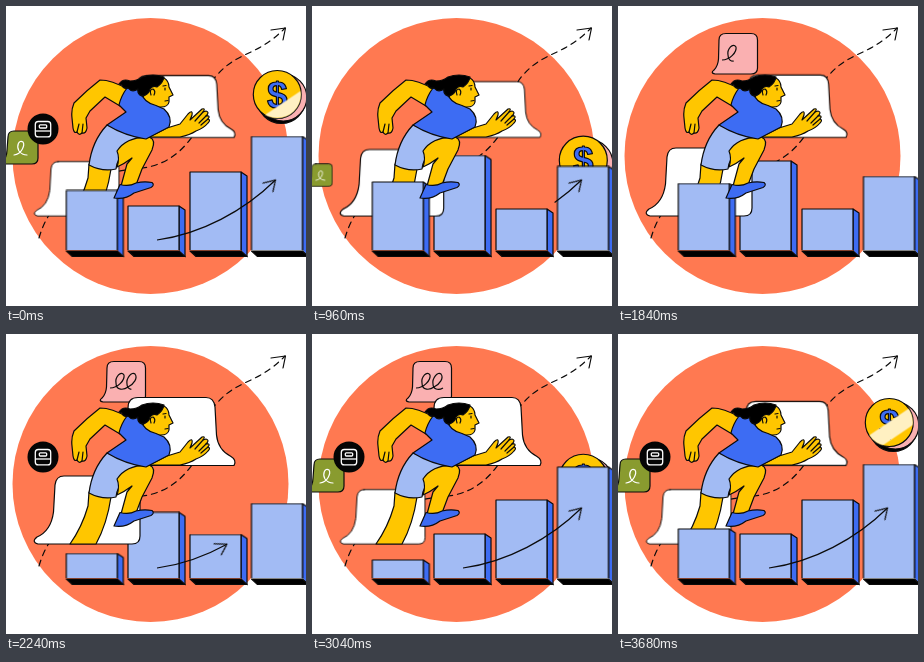
Animation of 300x300 px, one loop 3.76 s. Source, as an HTML page:

```html
<!DOCTYPE html>
<html lang="en">
<head>
<meta charset="utf-8">
<title>Climbing the chart</title>
<style>
html, body { margin: 0; width: 100%; height: 100%; overflow: hidden; background: #fff; }
svg { display: block; width: 100vw; height: 100vh; }
.ink { stroke: #0b0b0b; stroke-width: 1.2; stroke-linejoin: round; stroke-linecap: round; }
.line { fill: none; }
.skin { fill: #ffc600; }
.blue { fill: #3d6cf3; }
.pale { fill: #a2bbf4; }
.white { fill: #fff; }
.pink { fill: #fab0b1; }
.green { fill: #899b2f; }

.move { animation: 3760ms linear infinite; }
#bar1 { animation-name: bar1; animation-delay: -400ms; }
#bar2 { animation-name: bar2; }
#bar3 { animation-name: bar3; }
#bar4 { animation-name: bar4; }
#talkR { animation-name: talkR; animation-delay: -400ms; transform-origin: 228px 131px; }
#talkL { animation-name: talkL; transform-origin: 29px 210px; }
#pink { animation-name: pink; transform-origin: 93px 112px; }
#scrawl { animation-name: scrawl; stroke-dasharray: 100 200; stroke-linecap: butt; }
#green { animation-name: green; transform-origin: -5px 229px; }
#disc { animation-name: disc; transform-origin: 37px 123px; }
#coin { animation-name: coin; }
#shine { animation-name: shine; animation-delay: -320ms; }
#trend { animation-name: trend; stroke-dasharray: 100 200; stroke-linecap: butt; }
#tip { animation-name: tip; offset-path: path("M151 234C195 228 238 205 269.5 174"); offset-rotate: auto; }

@keyframes bar1 {
  0% { transform: translateY(226px); animation-timing-function: ease-in-out; }
  14.89%, 57.45% { transform: translateY(176px); animation-timing-function: ease-in-out; }
  74.47%, 100% { transform: translateY(226px); }
}
@keyframes bar2 {
  0%, 4.26% { transform: translateY(200px); animation-timing-function: ease-in-out; }
  18.09%, 46.81% { transform: translateY(149.5px); animation-timing-function: ease-out; }
  78.72%, 100% { transform: translateY(200px); }
}
@keyframes bar3 {
  0%, 2.13% { transform: translateY(166px); animation-timing-function: ease-in-out; }
  21.28%, 55.32% { transform: translateY(203px); animation-timing-function: ease-in-out; }
  78.72%, 100% { transform: translateY(166px); }
}
@keyframes bar4 {
  0%, 9.57% { transform: translateY(130.5px); animation-timing-function: ease-in-out; }
  34.04%, 56.38% { transform: translateY(170.5px); animation-timing-function: ease-in-out; }
  86.17%, 100% { transform: translateY(130.5px); }
}
@keyframes talkR {
  0% { transform: scale(1); animation-timing-function: ease-in-out; }
  21.28%, 48.94% { transform: scale(.82); animation-timing-function: ease-in-out; }
  69.15%, 100% { transform: scale(1); }
}
@keyframes talkL {
  0%, 4.26% { transform: scale(.8); animation-timing-function: ease-in-out; }
  31.91%, 59.57% { transform: scale(1); animation-timing-function: ease-in-out; }
  78.72%, 100% { transform: scale(.8); }
}
@keyframes pink {
  0%, 30.85% { transform: scale(0); animation-timing-function: cubic-bezier(.2, .5, .4, 1); }
  45.2%, 86.17% { transform: scale(1); animation-timing-function: ease-in; }
  97.5%, 100% { transform: scale(0); }
}
@keyframes scrawl {
  0%, 42% { stroke-dashoffset: 100; animation-timing-function: ease-out; }
  63.83%, 100% { stroke-dashoffset: 0; }
}
@keyframes green {
  0%, 19.15% { transform: scale(1); animation-timing-function: ease-in; }
  31.91%, 61.7% { transform: scale(0); animation-timing-function: ease-in-out; }
  78.72%, 100% { transform: scale(1); }
}
@keyframes disc {
  0%, 4.26% { transform: scale(1); animation-timing-function: ease-in; }
  14.89%, 48.94% { transform: scale(0); animation-timing-function: ease-out; }
  59.57%, 100% { transform: scale(1); }
}
@keyframes coin {
  0%, 14.89% { transform: translate(271.3px, 88.5px); animation-timing-function: ease-in; }
  29.79%, 74.47% { transform: translate(271.3px, 203px); animation-timing-function: ease-out; }
  92.55%, 100% { transform: translate(271.3px, 88.5px); }
}
@keyframes shine {
  0% { transform: translateY(-35px); animation-timing-function: ease-out; }
  14.89%, 100% { transform: translateY(35px); }
}
@keyframes trend {
  0%, 10.64% { stroke-dashoffset: 0; }
  17.02% { stroke-dashoffset: -22; }
  29.79% { stroke-dashoffset: -100; }
  29.8%, 48.94% { stroke-dashoffset: 100; }
  59.57% { stroke-dashoffset: 45; }
  72.34% { stroke-dashoffset: 8; }
  80.85%, 100% { stroke-dashoffset: 0; }
}
@keyframes tip {
  0%, 29.78% { offset-distance: 100%; opacity: 1; }
  29.79%, 48.94% { offset-distance: 0%; opacity: 0; }
  48.95% { offset-distance: 0%; opacity: 1; }
  59.57% { offset-distance: 55%; }
  72.34% { offset-distance: 92%; }
  80.85%, 100% { offset-distance: 100%; opacity: 1; }
}
</style>
</head>
<body>
<svg viewBox="0 0 300 300">
  <defs>
    <clipPath id="column"><path d="M-2-250H59V253L51 244H-2Z"/></clipPath>
    <clipPath id="face"><circle r="23.6"/></clipPath>
    <g id="body">
      <path class="ink blue" d="M51 0L57 4V260H51Z"/>
      <path class="ink pale" d="M0 0H51V250H0Z"/>
    </g>
    <path id="base" class="ink" d="M0 245H51L57 250.5H6Z"/>
  </defs>

  <circle cx="144.5" cy="150" r="138" fill="#ff7951"/>

  <path class="ink line" stroke-dasharray="6 5" d="M33 232C48 180 95 165 137 162C165 158 180 140 188 128C200 108 198 82 211 69C232 45 252 50 279 22"/>
  <path class="ink line" d="M265 24L279.500 22L277 34"/>

  <g id="pink" class="move">
    <path class="ink pink" d="M108 27.500H133Q139.500 27.500 139.500 34V62Q139.500 68 133 68H97Q92 67 96 64Q100 60 100.500 53L101 34Q101 27.500 108 27.500Z"/>
    <path id="scrawl" class="ink line move" pathLength="100" d="M104 54C112 54 119 46 118 41C115 36 109 43 110 49C110 57 118 56 122 53C128 50 132 44 129 40C126 37 120 44 121 50C121 55 126 57 131 54"/>
  </g>

  <path id="talkR" class="ink white move" d="M132 63.500H200Q208 63.500 209 73L210.500 101Q212 116 225 122.500Q231 126 228 131.500H122V74Q122 63.500 132 63.500Z"/>

  <g id="coin" class="move">
    <circle class="ink" cx="4" cy="5" r="24"/>
    <circle class="ink pink" cx="6" cy="3" r="23.500"/>
    <circle class="ink skin" r="24"/>
    <text class="ink blue" y="13" font-family="'Liberation Sans', Arial, sans-serif" font-weight="700" font-size="37" text-anchor="middle">$</text>
    <g clip-path="url(#face)"><g transform="rotate(-34)">
      <rect id="shine" class="move" x="-40" y="-8" width="80" height="16" fill="#fff0c2"/>
    </g></g>
  </g>

  <g transform="translate(122)"><g clip-path="url(#column)"><use id="bar2" class="move" href="#body"/></g><use href="#base"/></g>
  <g transform="translate(184)"><g clip-path="url(#column)"><use id="bar3" class="move" href="#body"/></g><use href="#base"/></g>
  <g transform="translate(245.500)"><g clip-path="url(#column)"><use id="bar4" class="move" href="#body"/></g><use href="#base"/></g>

  <path id="trend" class="ink line move" pathLength="100" d="M151 234C195 228 238 205 269.500 174"/>
  <path id="tip" class="ink line move" d="M-11-6.500L0 0L-10 6.500"/>

  <path id="talkL" class="ink white move" d="M58 142H126Q134 142 134 152V202Q134 210 126 210H32Q25 208 31 203Q45 197 47.500 178L49 151Q50 142 58 142Z"/>
  <path class="ink skin" d="M83 158L82 172Q76 193 64 210H90Q101 190 105 163Z"/>

  <g transform="translate(60.300)"><g clip-path="url(#column)"><use id="bar1" class="move" href="#body"/></g><use href="#base"/></g>

  <g id="green" class="move">
    <path class="ink green" d="M8 125H27Q32 125 32 130V152Q32 158 26 158H-5Q1 152 1 144L2 131Q2 125 8 125Z"/>
    <path class="ink line" style="stroke:#fff" d="M8 149C16 148 19 139 17 136C13 133 10 140 13 145Q16 149 21 149"/>
  </g>
  <g id="disc" class="move">
    <circle cx="37" cy="123" r="15.500" fill="#050505"/>
    <g fill="none" stroke="#fff" stroke-width="1.300">
      <rect x="29.300" y="115.500" width="15.400" height="15.400" rx="3"/>
      <rect x="33.300" y="118.800" width="7.400" height="3.200" rx="1"/>
      <path d="M29.500 125H44.500"/>
    </g>
  </g>

  <g id="runner">
    <path class="ink skin" d="M121 83Q106 74 94 74Q81 84 68 97Q65 104 66 112L67 122Q68 128 71 126Q73 130 76 127Q80 128 81 122L80 112L84 105L99 91L114 100Z"/>
    <path class="line ink" d="M71 126L73 118M76 127L77 118"/>
    <path class="ink skin" d="M143 131L161 122L174 118L182 108Q187 103 186 109L184 114L196 103Q200 102 197 106L200 105Q204 106 200 110Q205 109 202 113Q205 114 202 117Q198 122 190 125Q184 129 174 131Z"/>
    <path class="line ink" d="M197 106L189 115M200 110L193 117M202 113L195 119"/>
    <path class="ink pale" d="M101 119Q86 135 83 159Q96 166 110 163Q111 152 121 145L140 132Z"/>
    <path class="ink skin" d="M111 145Q121 130 144 131.500Q150 134 146 144L136 163L130 179L115 180L121 158L126 152Q118 158 111 161Q114 152 111 145Z"/>
    <path class="ink blue" d="M108 192L114 178.500Q123 181 130 177Q138 175 146 176.500Q149 179 145 181.500L128 187Q119 194 108 192Z"/>
    <path class="ink skin" d="M140 85L158 72Q163 75 163 81L167 89L163 91L163 96Q162 101 155 101L147 102L135 96Z"/>
    <path class="ink blue" d="M121 82L133 84Q138 97 150 99.500L158 103Q167 111 163 121L140 133Q119 130 101 119L120 106L113 99Q115 90 121 82Z"/>
    <path class="ink" d="M113 78Q117 72 124 75Q131 75 136 71Q147 67 158 71Q157 77 151 81Q147 79 144 83Q143 89 136 90Q131 88 132 83Q126 87 122 82Q117 83 116 79Z"/>
    <path class="ink skin" d="M145 89Q143 83 147 83Q150 85 148 89"/>
    <path class="line ink" d="M157 80L160 79.500M159 82V84M159 95L162 94.500"/>
  </g>
</svg>
<script>
const LOOP = 3760, STEP = 80;
const moves = document.getAnimations();
moves.forEach(move => move.pause());

function draw() {
  const t = Math.floor(((performance.now() + 2) % LOOP) / STEP) * STEP;
  moves.forEach(move => { move.currentTime = t; });
  requestAnimationFrame(draw);
}
draw();
</script>
</body>
</html>
```
